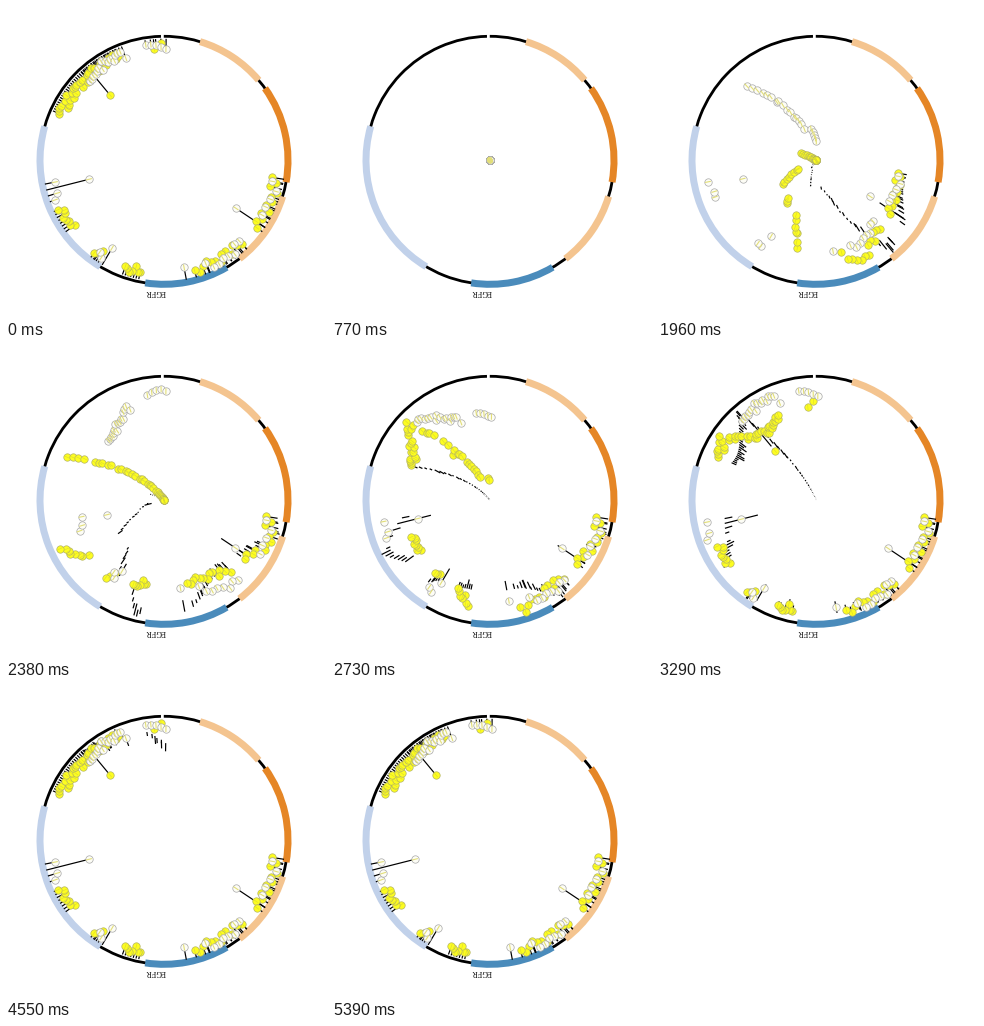
A matplotlib script for the animation above (5.67 s loop, 320 px wide and 312 px high).

```python
import numpy as np
import matplotlib.pyplot as plt
from matplotlib.animation import FuncAnimation
from matplotlib.collections import LineCollection
from matplotlib.patches import Wedge

W, H, DPI = 320, 312, 100
PT = 72 / DPI
CENTER = np.array([158, 154.3])
RING, FOOT, HEAD = 124, 121.5, 117.5
STEP, FRAMES = 70, 81
RESET, START, DELAY, DURATION = 560, 812, 20.2, 2000
LENGTH, SWEEP = 1210, 358.5

DOMAINS = [(57, 168, "#f4c48f"), (184, 338, "#e58626"), (361, 481, "#f4c48f"),
           (505, 637, "#4a8bbb"), (712, 965, "#c1d1ea")]

# first angle, last angle (clockwise from the top), number of lollipops
YELLOW = [(99, 126, 12), (137, 164.5, 13), (192, 200, 7), (214, 217, 3),
          (234, 245, 8), (294, 336, 36), (355, 358.5, 2)]
WHITE = [(101, 123.7, 6), (137, 158, 8), (169.4, 169.4, 1), (210.6, 215, 3),
         (250, 258.7, 4), (317, 339.5, 16), (351, 361, 5)]


def lollipops(clusters, tall, seed):
    """Angles spread over clusters, heads at random depth, a few long stems."""
    angle = np.concatenate([np.linspace(*c) for c in clusters])
    depth = 9 * np.random.default_rng(seed).random(len(angle)) ** 1.5
    radius = HEAD - depth
    for a, r in tall:
        radius[np.argmin(abs(angle - a))] = r
    return np.column_stack([angle, radius])


def direction(angle):
    a = np.radians(angle)
    return np.column_stack([np.sin(a), -np.cos(a)])


def bounce(t):
    t = np.clip(t, 0, 1)
    k = 7.5625
    return np.select(
        [t < 4 / 11, t < 8 / 11, t < 10 / 11],
        [k * t**2, k * (t - 6 / 11)**2 + 0.75, k * (t - 9 / 11)**2 + 0.9375],
        k * (t - 21 / 22)**2 + 0.984375)


def progress(n, ms):
    if ms < RESET:
        return np.ones((n, 1))
    return bounce((ms - START - DELAY * np.arange(n)) / DURATION)[:, None]


fig = plt.figure(figsize=(W / DPI, H / DPI), dpi=DPI, facecolor="white")
ax = fig.add_axes([0, 0, 1, 1])
ax.set(xlim=(0, W), ylim=(H, 0))
ax.axis("off")


def band(a0, a1, width, color, z):
    ax.add_patch(Wedge(CENTER, RING + width / 2, a0 - 90, a1 - 90,
                       width=width, fc=color, ec="none", zorder=z))


def line_layer(color, width, z):
    lines = LineCollection([], colors=color, linewidths=width * PT, zorder=z)
    return ax.add_collection(lines)


class Heads:
    """Discs crossed by a thin radial bar."""

    def __init__(self, items, face, edge, bar, width, z):
        self.unit = direction(items[:, 0])
        self.end = self.unit * items[:, 1:]
        self.disc = ax.scatter(*(self.end + CENTER).T, s=(7.4 * PT)**2, c=face,
                               edgecolors=edge, linewidths=0.7 * PT, zorder=z)
        self.bar = line_layer(bar, width, z + 0.5)

    def move(self, ms):
        pts = self.end * progress(len(self.end), ms) + CENTER
        self.disc.set_offsets(pts)
        self.bar.set_segments(np.stack([pts - 3 * self.unit, pts + 3 * self.unit], axis=1))


class Stems:
    def __init__(self, items):
        items = items[np.argsort(items[:, 0], kind="stable")]
        unit = direction(items[:, 0])
        self.ends = np.stack([unit * items[:, 1:], unit * FOOT], axis=1)
        self.lines = line_layer("black", 1.2, 3)

    def move(self, ms):
        p = progress(len(self.ends), ms)[:, None]
        self.lines.set_segments(self.ends * p + CENTER)


band(-0.1, 358.6, 2.8, "black", 1)
for p0, p1, color in DOMAINS:
    band(p0 * SWEEP / LENGTH, p1 * SWEEP / LENGTH, 7, color, 2)
ax.text(149.5, 285.7, "EGFR", family="Liberation Serif", size=8 * PT,
        rotation=180, ha="center", va="center", color="black")

yellow = lollipops(YELLOW, [(320.5, 85)], 4)
white = lollipops(WHITE, [(123.7, 86.5), (210.6, 102), (255.8, 77.4), (169.4, 109)], 9)
layers = [
    Stems(np.vstack([yellow, white])),
    Heads(yellow, "#fdfd20", "#b4b464", "#dcdc30", 0.6, 4),
    Heads(white, "#fdfdf6", "#a8a8a8", "#e2de78", 1.1, 5),
]


def draw(i):
    for layer in layers:
        layer.move(i * STEP)
    return ()


anim = FuncAnimation(fig, draw, frames=FRAMES, interval=STEP, repeat=True,
                     repeat_delay=0, blit=False)
plt.show()
```
